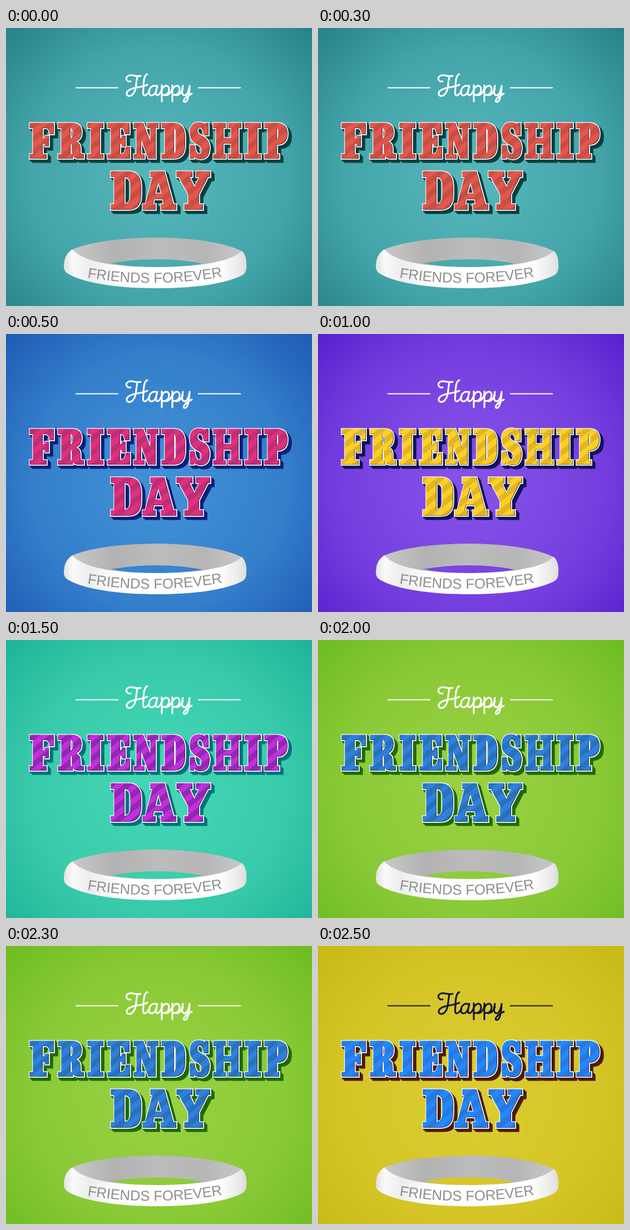
An HTML page that plays this animation: 550x500 px, repeating every 3 s.

```html
<!DOCTYPE html>
<html lang="en">
<head>
<meta charset="utf-8">
<title>Happy Friendship Day</title>
<style>
  html, body { margin: 0; width: 100%; height: 100%; overflow: hidden; }
  svg { display: block; width: 550px; height: 500px; }
  .inner { stop-color: var(--inner); }
  .middle { stop-color: color-mix(in srgb, var(--inner) 66%, var(--outer)); }
  .outer { stop-color: var(--outer); }
  .light { stop-color: var(--light); }
  .dark { stop-color: var(--dark); }
  .shade { fill: var(--shade); stroke: var(--shade); }
  .script { fill: none; stroke: var(--ink); stroke-width: 3.1; stroke-linecap: round; stroke-linejoin: round; }
  .rule { stroke-width: 2; stroke-linecap: butt; }
  .outline { fill: #fff; stroke: #fff; }
  .band { font: 25.7px "Liberation Sans", Arial, sans-serif; fill: #8e8e8e; }
</style>
</head>
<body>
<svg id="card" viewBox="0 0 550 500">
  <defs>
    <radialGradient id="glow" gradientUnits="userSpaceOnUse" cx="275" cy="265" r="385">
      <stop class="inner" offset=".1"/><stop class="middle" offset=".6"/><stop class="outer" offset="1"/>
    </radialGradient>
    <linearGradient id="stripes" gradientUnits="userSpaceOnUse" x1="0" y1="0" x2="12" y2="15" spreadMethod="repeat">
      <stop class="light" offset=".5"/><stop class="dark" offset=".5"/>
    </linearGradient>
    <linearGradient id="inside">
      <stop stop-color="#c9c9c9"/><stop offset=".25" stop-color="#b2b2b2"/>
      <stop offset=".5" stop-color="#bcbcbc"/><stop offset=".78" stop-color="#b6b6b6"/>
      <stop offset="1" stop-color="#c8c8c8"/>
    </linearGradient>
    <linearGradient id="front">
      <stop stop-color="#e2e2e2"/><stop offset=".05" stop-color="#fafafa"/>
      <stop offset=".14" stop-color="#ececec"/><stop offset=".3" stop-color="#fff"/>
      <stop offset=".85" stop-color="#fff"/><stop offset=".95" stop-color="#ececec"/>
      <stop offset="1" stop-color="#dcdcdc"/>
    </linearGradient>
    <g id="title" stroke-width="3.6" fill-rule="evenodd">
      <path d="M43 171H86V191H79Q78 180 71 180H66V199Q71 199 71 194H77V213H71Q71 208 66 208V227H73V235H43V227H49V180H43Z"/>
      <path d="M94 171H119Q136 171 136 187Q136 200 126 204Q134 207 134 217V224Q134 227 140 227V235H130Q119 235 119 223V215Q119 208 116 208V227H120V235H94V227H100V180H94ZM116 180V199Q121 199 121 190Q121 180 116 180Z"/>
      <path id="i" d="M147 171H175V180H169V227H175V235H147V227H153V180H147Z"/>
      <path d="M183 171H222V191H214Q213 180 207 180H205V199Q209 199 209 194H215V213H209Q209 208 205 208V227H208Q215 226 216 214H223V235H183V227H189V180H183Z"/>
      <path d="M230 171H247L260 206V180H254V171H274V180H269V235H256L243 199V227H249V235H230V227H235V180H230Z"/>
      <path d="M280 171H301Q322 171 322 196V210Q322 235 301 235H280V227H286V180H280ZM302 180V227Q306 226 306 212V194Q306 181 302 180Z"/>
      <path d="M348 170Q355 170 358 174V171H364V193H356Q354 179 348 179Q344 179 344 185Q344 190 352 194Q366 200 366 215Q366 236 350 236Q342 236 338 231V235H331V211H339Q341 227 348 227Q352 227 352 220Q352 214 345 210Q331 204 331 189Q331 170 348 170Z"/>
      <path d="M373 171H395V180H391V198H405V180H400V171H423V180H418V227H423V235H400V227H405V208H391V227H395V235H373V227H378V180H373Z"/>
      <use href="#i" x="283"/>
      <path d="M465 171H487Q506 171 506 190Q506 210 487 210V227H491V235H465V227H471V180H465ZM487 180V201Q490 200 490 190Q490 181 487 180Z"/>
      <path d="M189 258H220Q243 258 243 285V300Q243 327 220 327H189V317H195V268H189ZM213 268V317Q224 316 224 302V283Q224 269 213 268Z"/>
      <path d="M260 258H285L301 317H306V327H279V317H284L282 308H266L264 317H269V327H246V317H251L264 268H260ZM268 298H280L274 276Z"/>
      <path d="M307 258H335V268H330L339 287L348 268H342V258H367V268H363L347 299V317H354V327H321V317H328V299L311 268H307Z"/>
    </g>
    <path id="p" d="M280 103V132M280 112C283 102 293 101 293 110C293 118 287 122 280 120M287 121C293 121 296 116 299 110"/>
    <path id="arc" d="M146 449Q268 468.500 391 447"/>
  </defs>

  <rect width="550" height="500" fill="url(#glow)"/>

  <g class="script" role="img" aria-label="Happy">
    <path class="rule" d="M125 107.500H202M345 107.500H422"/>
    <path d="M224 96C215 98 213 86 223 85C229 84 234 88 242 86M236 88C233 100 235 112 228 119C224 124 216 123 217 117C218 112 224 110 230 108C238 106 246 106 254 102"/>
    <path d="M254 83C249 84 247 96 247 108C246 117 246 122 250 121C254 120 256 116 258 113"/>
    <path d="M271 105C264 101 257 108 257 115C257 123 264 123 268 117C271 112 271 108 272 104C270 112 268 121 272 121C275 121 278 116 280 111"/>
    <use href="#p"/><use href="#p" x="19"/>
    <path d="M318 104C316 111 315 121 321 121C326 121 329 112 330 104C330 112 328 134 321 133C316 132 322 124 334 118"/>
  </g>

  <g role="img" aria-label="Friendship Day">
    <g id="depth" class="shade"></g>
    <use href="#title" class="outline"/>
    <use href="#title" fill="#2a1028"/>
    <use href="#title" x="-.7" y="-.4" fill="url(#stripes)"/>
  </g>

  <path fill="url(#inside)" fill-rule="evenodd" d="M118 399C150 384 210 377 270 377C335 377 395 386 425 402C400 424 330 431 270 431C200 431 140 423 118 399ZM189 423Q230 416 273 416Q315 416 354 424Q315 430 270 430Q225 430 189 423Z"/>
  <path fill="url(#front)" d="M119 398C109 405 104 414 104 429C104 438 109 441 117 445C150 461 210 468 270 468C335 468 390 461 422 446C430 442 432 438 432 430C433 418 431 408 424 401C400 424 330 430 270 430C200 430 140 422 119 398Z"/>
  <text class="band"><textPath href="#arc">FRIENDS FOREVER</textPath></text>
</svg>
<script>
  const card = document.getElementById('card');
  const names = ['inner', 'outer', 'light', 'dark', 'shade', 'ink'];
  const themes = [
    '#53b5ba #238388 #e2574c #c94e44 #06403f #fff',
    '#4090d6 #1d5ab3 #e0307c #bf2d76 #0a1f7a #fff',
    '#8450e8 #581dce #ffcf26 #e2b620 #0e1458 #fff',
    '#44d6b3 #1fb298 #c030dc #9426b4 #00707c #fff',
    '#98d042 #6cbc20 #2f80de #2872bc #1f6a00 #fff',
    '#dccb30 #c6b912 #2288ff #2878e0 #4a1c08 #161630'
  ].map(theme => theme.split(' '));
  const hold = 500;

  for (let step = 1; step <= 6; step++) {
    const layer = document.createElementNS('http://www.w3.org/2000/svg', 'use');
    layer.setAttribute('href', '#title');
    layer.setAttribute('x', step);
    layer.setAttribute('y', step * 0.95);
    document.getElementById('depth').append(layer);
  }

  function draw() {
    const theme = themes[Math.floor(performance.now() / hold) % themes.length];
    names.forEach((name, i) => card.style.setProperty('--' + name, theme[i]));
    requestAnimationFrame(draw);
  }
  draw();
</script>
</body>
</html>
```
